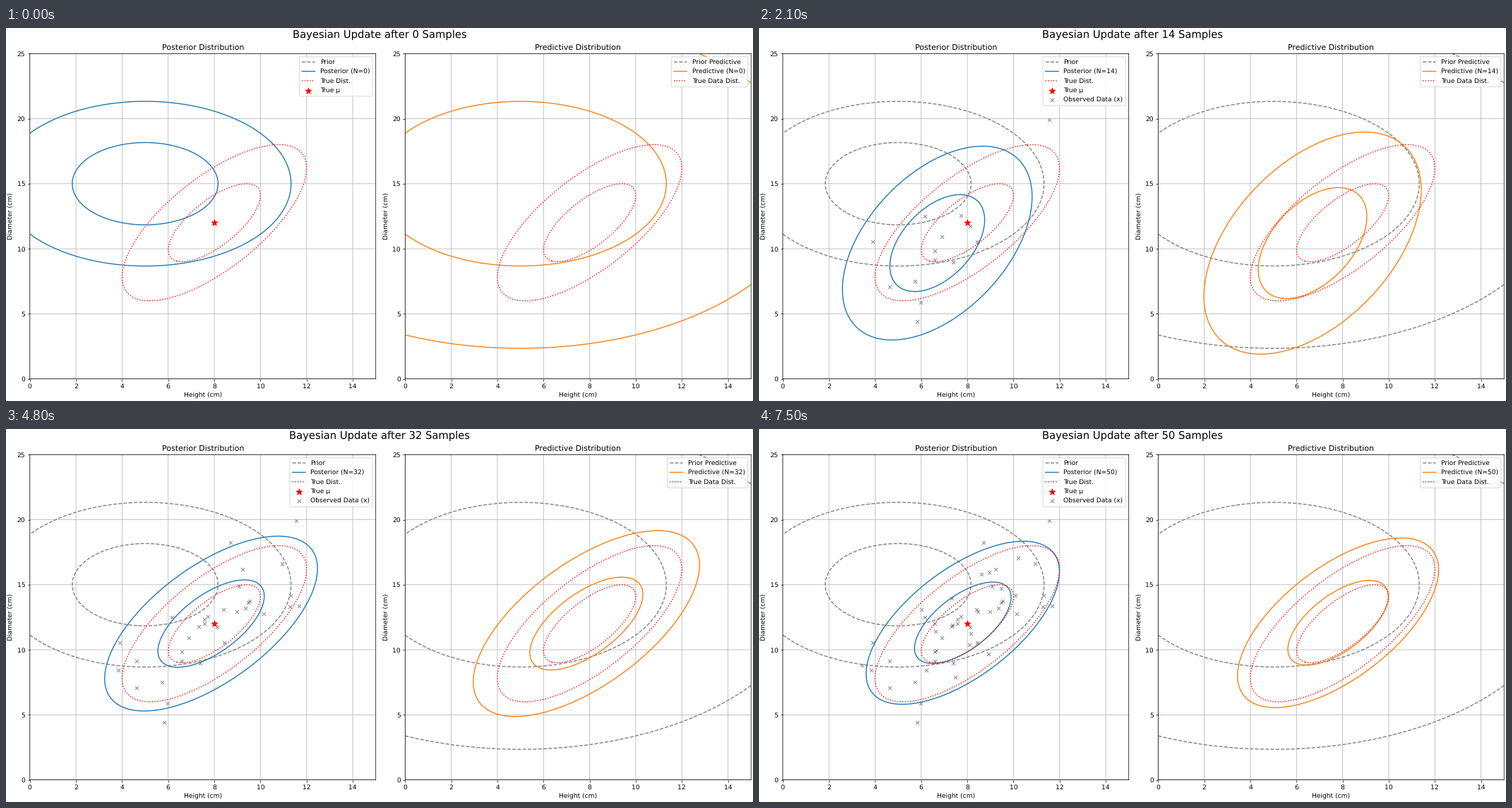
Write a matplotlib script that moves like this. It is 1058 px wide and 529 px high and loops after 7.65 s.

```python
import matplotlib.pyplot as plt
import numpy as np
from matplotlib.animation import FuncAnimation

plt.rcParams["path.snap"] = False

SAMPLES = 50
DIM = 2
DPI = 66.125

# True distribution of (height, diameter)
TRUE_MU = np.array([8.0, 12.0])
TRUE_COV = np.array([[4.0, 4.2], [4.2, 9.0]])

# Normal-inverse-Wishart prior
MU0 = np.array([5.0, 15.0])
KAPPA0 = 1
NU0 = 2
PSI0 = 20 * np.eye(DIM)

GRID_X, GRID_Y = np.meshgrid(np.linspace(0, 15, 100), np.linspace(0, 25, 100))
GRID = np.stack([GRID_X, GRID_Y], axis=-1)
LEVELS = np.exp([-2.0, -0.5])  # two and one standard deviations


def draw_samples(count):
    """Correlated normal samples along the principal axes of TRUE_COV."""
    (a, b), (_, d) = TRUE_COV
    angle = 0.5 * np.arctan2(2 * b, a - d)
    c, s = np.cos(angle), np.sin(angle)
    axes = np.array([[-c, -s], [-s, c]])
    spread = np.hypot((a - d) / 2, b)
    scale = np.sqrt((a + d) / 2 + np.array([spread, -spread]))
    z = np.random.RandomState(0).standard_normal((count, DIM))
    return TRUE_MU + (z * scale) @ axes


def update_belief(x):
    """Return mean, posterior covariance and predictive covariance."""
    n = len(x)
    kappa, nu = KAPPA0 + n, NU0 + n
    mu = (KAPPA0 * MU0 + x.sum(axis=0)) / kappa
    psi = PSI0 + x.T @ x + KAPPA0 * np.outer(MU0, MU0) - kappa * np.outer(mu, mu)
    df = nu - DIM + 1
    pred = psi * (kappa + 1) / (kappa * df)
    if df > 2:
        pred = pred * df / (df - 2)
    return mu, psi / nu, pred


def add_contours(ax, mu, cov, color, style, label, visible=True):
    """Outline a normal density and add its legend entry."""
    ax.plot([], [], color=color, ls=style, label=label)
    if visible:
        diff = GRID - mu
        dist = np.einsum("...i,ij,...j", diff, np.linalg.inv(cov), diff)
        ax.contour(GRID_X, GRID_Y, np.exp(-dist / 2), levels=LEVELS,
                   colors=color, linestyles=style)


def start_panel(ax, name):
    ax.clear()
    ax.set(xlim=(0, 15), ylim=(0, 25), xlabel="Height (cm)",
           ylabel="Diameter (cm)", title=f"{name} Distribution")
    ax.grid(True)


data = draw_samples(SAMPLES)
mu0, post0, pred0 = update_belief(data[:0])

fig, (ax_post, ax_pred) = plt.subplots(
    1, 2, figsize=(16, 8), dpi=DPI, layout="constrained")
heading = fig.suptitle("Bayesian Update after 0 Samples", fontsize=16)


def update(n):
    seen = data[:n]
    mu, post, pred = update_belief(seen)
    heading.set_text(f"Bayesian Update after {n} Samples")

    start_panel(ax_post, "Posterior")
    add_contours(ax_post, mu0, post0, "gray", "dashed", "Prior", n > 0)
    add_contours(ax_post, mu, post, "tab:blue", "solid", f"Posterior (N={n})")
    add_contours(ax_post, TRUE_MU, TRUE_COV, "red", "dotted", "True Dist.")
    ax_post.scatter(*TRUE_MU, c="red", marker="*", s=100, zorder=5, label="True μ")
    if n > 0:
        ax_post.scatter(*seen.T, c="black", marker="x", s=30, lw=1, alpha=0.5,
                        label="Observed Data (x)")
    ax_post.legend(loc="upper right")

    start_panel(ax_pred, "Predictive")
    add_contours(ax_pred, mu0, pred0, "gray", "dashed", "Prior Predictive", n > 0)
    add_contours(ax_pred, mu, pred, "tab:orange", "solid", f"Predictive (N={n})")
    add_contours(ax_pred, TRUE_MU, TRUE_COV, "red", "dotted", "True Data Dist.")
    ax_pred.legend(loc="upper right")
    return []


# Settle the layout once at a finer resolution, then keep it fixed
update(0)
fig.set_dpi(100)
fig.canvas.draw()
fig.set_layout_engine("none")
fig.set_dpi(DPI)
plt.rcParams["text.hinting"] = "none"

anim = FuncAnimation(fig, update, frames=SAMPLES + 1, init_func=lambda: update(0),
                     interval=150, repeat=True, repeat_delay=0)
plt.show()
```
